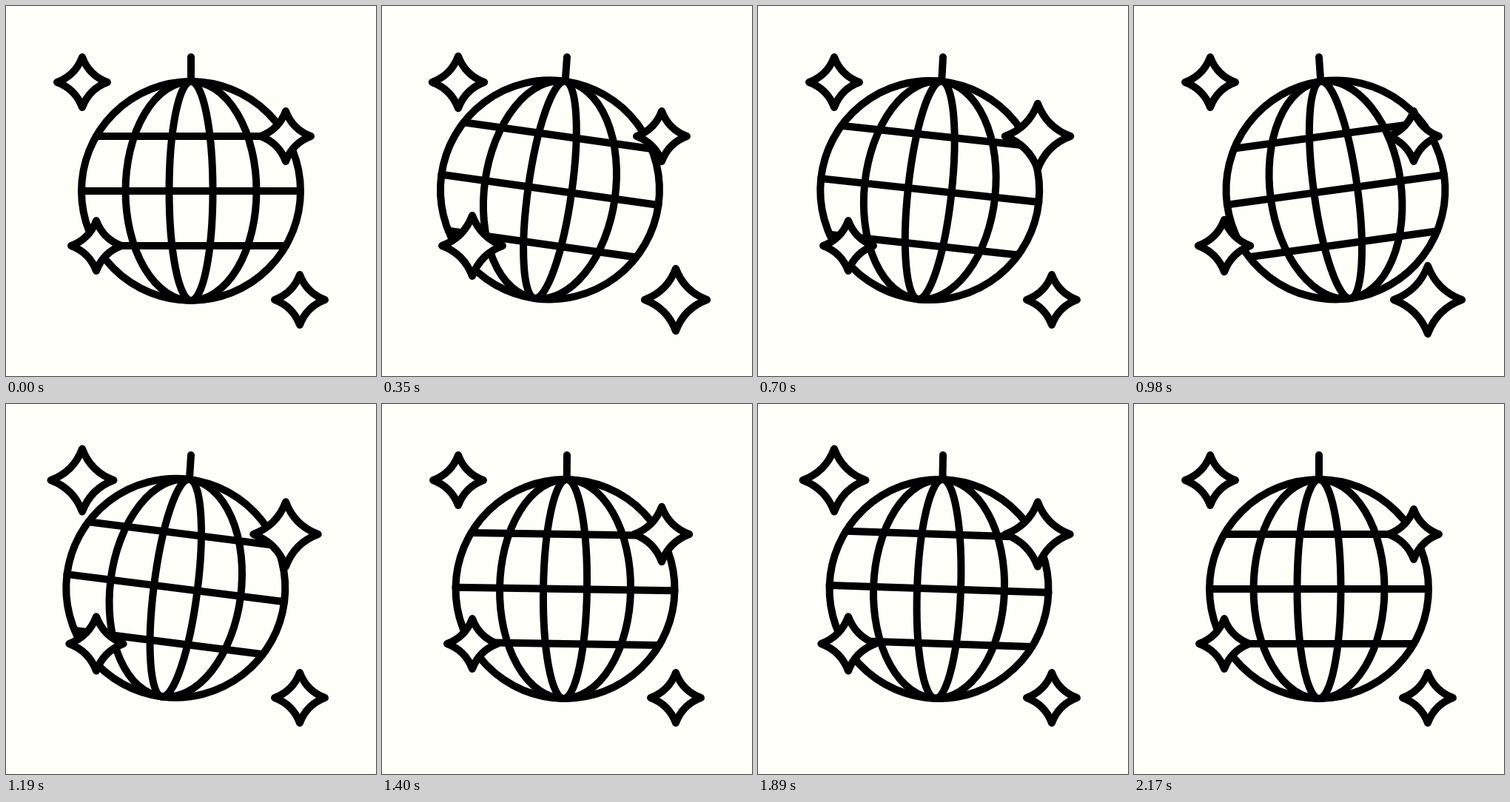
An HTML page with a canvas for the animation above (2240 ms loop, 500 by 500 pixels).

```html
<!DOCTYPE html>
<html lang="en">
<head>
<meta charset="utf-8">
<title>Disco ball</title>
<style>
html, body { margin: 0; width: 100%; height: 100%; overflow: hidden; background: #fffffa; }
canvas { display: block; width: 100vmin; height: 100vmin; }
</style>
</head>
<body>
<canvas id="stage" width="500" height="500"></canvas>
<script>
const ctx = document.getElementById('stage').getContext('2d');
const PAPER = '#fffffa', STEP = 70, STEPS = 32;
const PIVOT = { x: 250, y: 85 }, R = 148, DROP = 165;

// Swing extremes: [step, degrees]
const swing = [[0, 0], [8.2, 12], [13.3, -9], [17.4, 7.6], [22.3, -4.7], [27, 1.9], [31, 0], [32, 0]];

// Each star swells around its peak steps, over `w` steps on either side
const stars = [
  { x: 103, y: 103, w: 2, peaks: [6.6, 16.2, 26.2] },
  { x: 378, y: 176, w: 3, peaks: [9.1, 18, 28] },
  { x: 122, y: 324, w: 2, peaks: [5.95, 15.6, 25.6] },
  { x: 397, y: 397, w: 3, peaks: [3.75, 13.5, 23.1] }
];

function swingAngle(s) {
  const i = swing.findIndex(k => k[0] > s);
  const [t0, a0] = swing[i - 1], [t1, a1] = swing[i];
  const ease = (1 - Math.cos(Math.PI * (s - t0) / (t1 - t0))) / 2;
  return (a0 + (a1 - a0) * ease) * Math.PI / 180;
}

function starSize({ peaks, w }, s) {
  const d = Math.min(...peaks.map(p => Math.abs(s - p)));
  return 34 + (d < w ? 13 * Math.cos(Math.PI * d / (2 * w)) ** 2 : 0);
}

function line(x0, y0, x1, y1) {
  ctx.beginPath();
  ctx.moveTo(x0, y0);
  ctx.lineTo(x1, y1);
  ctx.stroke();
}

function drawBall(angle) {
  const top = DROP - R;
  line(250, 69, PIVOT.x - top * Math.sin(angle), PIVOT.y + top * Math.cos(angle));
  ctx.save();
  ctx.translate(PIVOT.x, PIVOT.y);
  ctx.rotate(angle);
  ctx.translate(0, DROP);
  for (const rx of [R, 88.5, 29.5]) {
    ctx.beginPath();
    ctx.ellipse(0, 0, rx, R, 0, 0, 2 * Math.PI);
    ctx.stroke();
  }
  for (const y of [-74, 0, 74]) {
    const half = Math.sqrt(R * R - y * y);
    line(-half, y, half, y);
  }
  ctx.restore();
}

function drawStar(x, y, r) {
  const c = r * 0.27;
  ctx.beginPath();
  ctx.moveTo(x, y - r);
  ctx.quadraticCurveTo(x + c, y - c, x + r, y);
  ctx.quadraticCurveTo(x + c, y + c, x, y + r);
  ctx.quadraticCurveTo(x - c, y + c, x - r, y);
  ctx.quadraticCurveTo(x - c, y - c, x, y - r);
  ctx.closePath();
  ctx.fill();
  ctx.stroke();
}

function draw() {
  const s = Math.floor(performance.now() / STEP) % STEPS;
  ctx.fillStyle = PAPER;
  ctx.fillRect(0, 0, 500, 500);
  ctx.strokeStyle = '#000';
  ctx.lineWidth = 10;
  ctx.lineCap = ctx.lineJoin = 'round';
  drawBall(swingAngle(s));
  for (const star of stars) drawStar(star.x, star.y, starSize(star, s));
  requestAnimationFrame(draw);
}
draw();
</script>
</body>
</html>
```
